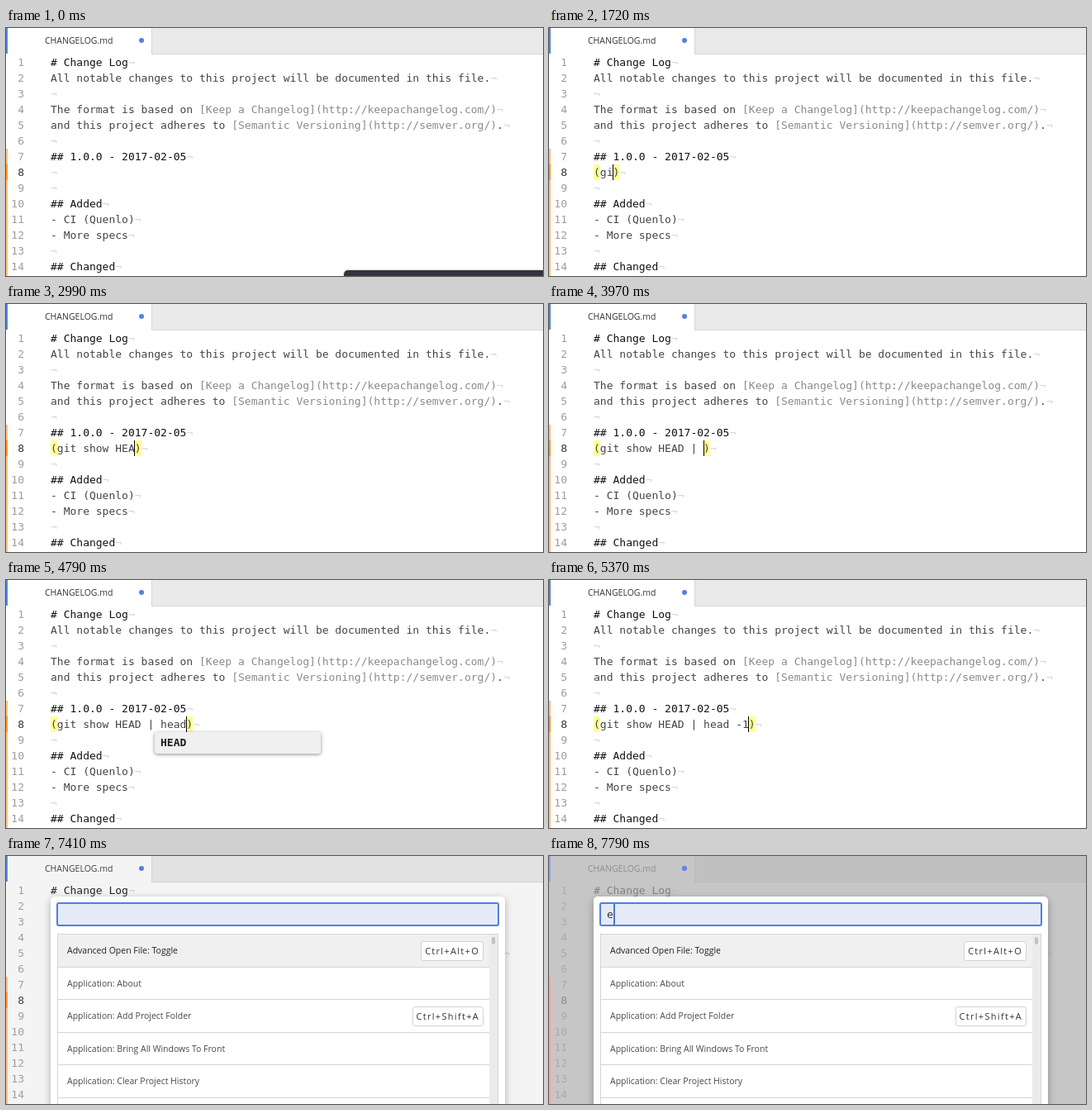
Animation, 650 px wide and 300 px high, one loop 8 s. Source, as an HTML page:

```html
<!DOCTYPE html>
<html lang="en">
<head>
<meta charset="utf-8">
<title>Changelog editor</title>
<style>
  html, body { margin: 0; width: 100%; height: 100%; overflow: hidden; background: #fff; }
  #stage { position: relative; width: 650px; height: 300px; overflow: hidden; background: #fff;
    font: 13px/19px "DejaVu Sans Mono", monospace; color: #444; }
  #stage div { position: absolute; box-sizing: border-box; white-space: pre; }
  .ui { font: 10.5px/39px "Open Sans", sans-serif; }
  #bar { left: 176px; top: 0; width: 474px; height: 32px; background: #eaeaea;
    border: solid #d6d6d6; border-width: 0 0 1px 1px; }
  #tab { left: 47px; top: 0; line-height: 31px; color: #333; }
  .edge { left: 0; top: 0; width: 2px; height: 31px; background: #5283de; }
  .dot { left: 161px; top: 12px; width: 6px; height: 6px; border-radius: 50%; background: #5283de; }
  .git { left: 0; top: 146px; width: 2px; height: 154px; background: #ffbf7d; }
  #gitNow { left: 0; top: 165px; width: 2px; height: 19px; background: #ff942b; }
  .num { left: 0; width: 22px; text-align: right; color: #9d9d9d; }
  .num.now { color: #333; }
  .line { left: 54px; }
  .line b { font-weight: normal; color: #111; }
  .line i { font-style: normal; color: #8a8a8a; }
  .line s { text-decoration: none; color: #d4d4d4; }
  .mark { top: 165px; height: 19px; background: #ffff96; }
  #sel { top: 165px; height: 19px; background: #b2e6fb; }
  #caret { top: 165px; width: 1px; height: 19px; background: #000; }
  #popup { top: 184px; width: 201px; height: 26px; padding-left: 7px; line-height: 26px;
    font-weight: bold; color: #1c1c1c; background: #f0f0f0; border-radius: 3px;
    box-shadow: 0 1px 4px rgba(0,0,0,.45); }
  #toast { left: 409px; top: 293px; width: 245px; height: 20px; border-radius: 5px 0 0 0;
    background: #343440; box-shadow: 0 0 3px rgba(0,0,0,.3); }
  #dim { inset: 0; background: rgba(176,176,176,.72); }
  #dim .edge { background: #8fa9f0; }
  #dim .dot { background: #5f87e6; }
  #dim .git { background: #ffa0a0; }
  #palette { left: 54px; top: 49px; width: 550px; height: 270px; border-radius: 5px; background: #fff;
    box-shadow: 0 3px 10px rgba(0,0,0,.3); }
  #input { left: 7px; top: 7px; width: 536px; height: 29px; padding-left: 7px; line-height: 25px;
    border: 2px solid #5180d8; border-radius: 3px; background: #e5eaf8; color: #333; }
  #inputCaret { left: 24px; top: 9px; width: 2px; height: 25px; background: #4a78cf; }
  #list { left: 8px; top: 45px; width: 534px; height: 230px; border: 1px solid #d4d4d4; }
  .row { left: 0; width: 522px; height: 39.5px; padding-left: 11px; border-bottom: 1px solid #d4d4d4; color: #484848; }
  .row:first-child { background: #f0f0f0; color: #222; }
  .key { right: 7px; top: 8px; height: 24px; padding: 0 4px; border: 1px solid #d2d2d2; border-radius: 3px;
    background: #fff; color: #333; font-size: 11px; line-height: 22px; letter-spacing: 1.3px; }
  #track { left: 522px; top: 0; width: 10px; height: 230px; background: #ebebeb; }
  #thumb { left: 3px; top: 3px; width: 4px; height: 9px; border-radius: 2px; background: #c2c2c2; }
</style>
</head>
<body>
<div id="stage">
  <div id="bar"></div>
  <div id="tab" class="ui">CHANGELOG.md</div>
  <div class="edge"></div><div class="dot"></div>
  <div class="git"></div><div id="gitNow"></div>
  <div class="mark" id="open"></div><div class="mark" id="close"></div>
  <div id="sel"></div>
  <div id="text"></div>
  <div id="caret"></div>
  <div id="popup"></div>
  <div id="toast"></div>
  <div id="dim"><div class="edge"></div><div class="dot"></div><div class="git"></div></div>
  <div id="palette">
    <div id="input"></div><div id="inputCaret"></div>
    <div id="list"></div>
  </div>
</div>
<script>
const LOOP = 8000, LEFT = 54, CHAR = 13 * 1233 / 2048;
const $ = id => document.getElementById(id);
const show = (el, on) => { el.style.display = on ? "" : "none"; };
const col = i => LEFT + i * CHAR;

const lines = [
  "<b># Change Log</b>",
  "All notable changes to this project will be documented in this file.",
  "",
  "The format is based on <i>[Keep a Changelog](http://keepachangelog.com/)</i>",
  "and this project adheres to <i>[Semantic Versioning](http://semver.org/)</i>.",
  "",
  "<b>## 1.0.0 - 2017-02-05</b>",
  "<span id='typed'></span>",
  "",
  "<b>## Added</b>",
  "- CI (Quenlo)",
  "- More specs",
  "",
  "<b>## Changed</b>"
];
$("text").innerHTML = lines.map((html, i) => {
  const top = `style="top:${32 + 19 * i}px"`;
  return `<div class="num${i === 7 ? " now" : ""}" ${top}>${i + 1}</div>` +
    `<div class="line" ${top}>${html}<s>¬</s></div>`;
}).join("");

const commands = [
  ["Advanced Open File: Toggle", "Ctrl+Alt+O"],
  ["Application: About"],
  ["Application: Add Project Folder", "Ctrl+Shift+A"],
  ["Application: Bring All Windows To Front"],
  ["Application: Clear Project History"],
  [""]
];
$("list").innerHTML = commands.map(([name, key], i) =>
  `<div class="row ui" style="top:${39.5 * i}px">${name}${key ? `<div class="key">${key}</div>` : ""}</div>`
).join("") + '<div id="track"><div id="thumb"></div></div>';

const command = "git show HEAD | head -1";
const keyTimes = [1560, 1720, 1790, 1870, 2070, 2160, 2320, 2410, 2470, 2650, 2760, 2990,
  3170, 3370, 3700, 3970, 4320, 4360, 4530, 4680, 4830, 5050, 5370];
const hints = [
  { from: 2360, to: 2470, col: 5, word: "show" },
  { from: 4600, to: 4830, col: 17, word: "HEAD" }
];
const dimSteps = [0.19, 0.55, 0.78, 0.92, 1];

function place(el, from, to) {
  el.style.left = Math.round(col(from)) + "px";
  el.style.width = Math.round(col(to)) - Math.round(col(from)) + "px";
}

function render(t) {
  const opened = t >= 1290, selected = t >= 5800, modal = t >= 7410;
  const count = keyTimes.filter(k => k <= t).length;
  const end = opened ? count + 1 : 0;

  $("typed").textContent = opened ? "(" + command.slice(0, count) + ")" : "";
  show($("toast"), t < 550);

  const paired = opened && !selected;
  show($("open"), paired);
  show($("close"), paired);
  place($("open"), 0, 1);
  place($("close"), end, end + 1);

  show($("caret"), (t >= 550 && t < 930) || paired);
  $("caret").style.left = Math.floor(col(end)) + "px";

  show($("sel"), selected);
  place($("sel"), t < 6260 ? 0 : 1, end);

  const hint = hints.find(h => t >= h.from && t < h.to);
  show($("popup"), hint);
  if (hint) {
    $("popup").textContent = hint.word;
    $("popup").style.left = Math.round(col(hint.col)) - 7 + "px";
  }

  show($("dim"), modal);
  show($("palette"), modal);
  if (modal) $("dim").style.opacity = dimSteps[Math.min(4, Math.floor((t - 7410) / 40))];
  $("input").textContent = t >= 7750 ? "e" : "";
  show($("inputCaret"), t >= 7790);
}

const start = performance.now();
function tick() {
  render((performance.now() - start) % LOOP);
  requestAnimationFrame(tick);
}
tick();
</script>
</body>
</html>
```
